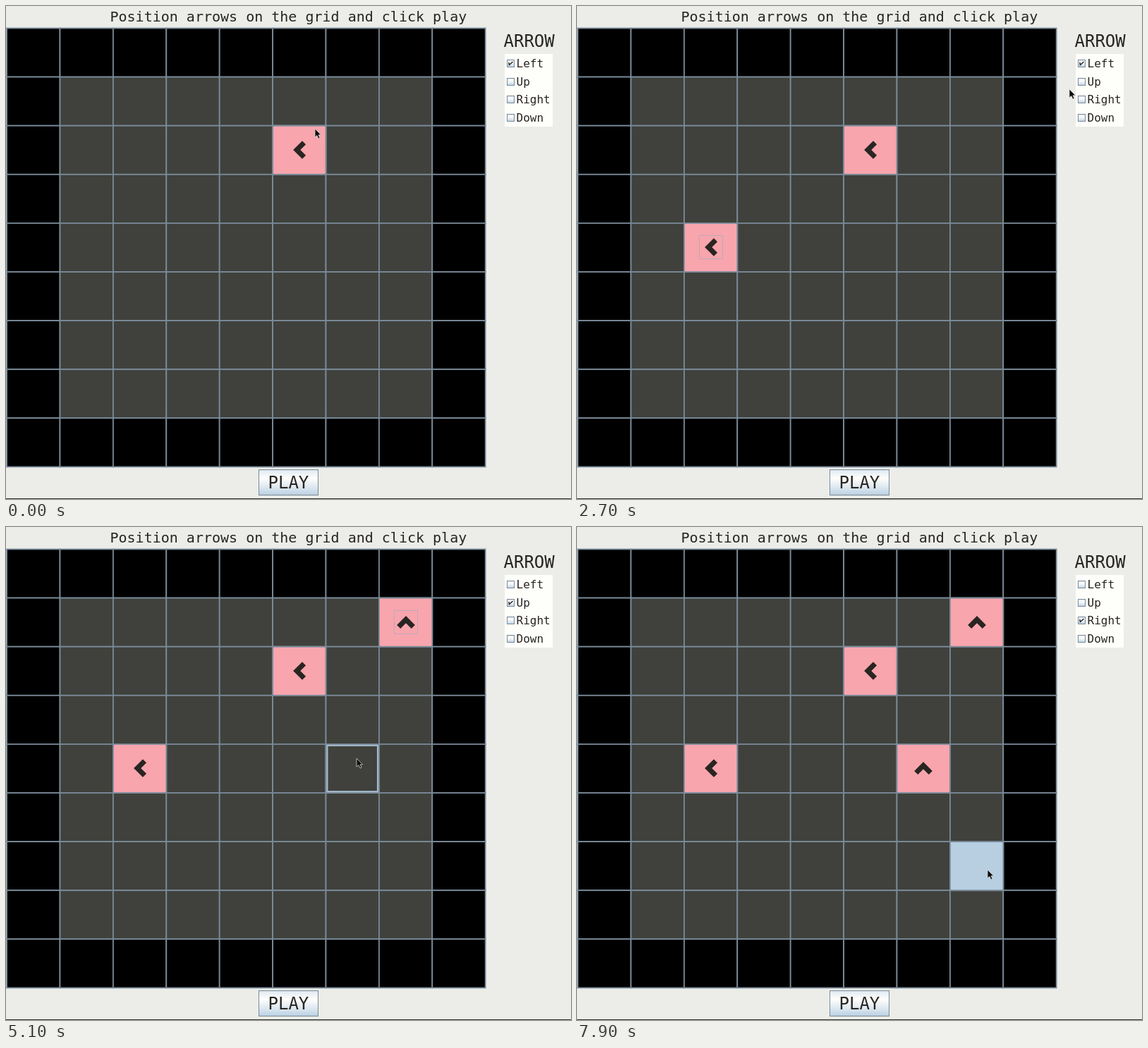
An HTML page with a canvas that plays this animation: 801 px wide and 699 px high, repeating every 8000 ms.

```html
<!DOCTYPE html>
<html lang="en">
<head>
<meta charset="utf-8">
<title>Arrow grid</title>
<style>
html, body { margin: 0; width: 100%; height: 100%; overflow: hidden; background: #ecede8; }
canvas { display: block; }
</style>
</head>
<body>
<canvas id="stage" width="801" height="699"></canvas>
<script>
const LOOP = 8000, STEP = 100, LAG = 100;
const SIZE = 9, CELL_W = 75.4, CELL_H = 69.1, LEFT = 1.1, TOP = 31.5;
const OPTION_TOP = 76, OPTION_GAP = 25.7;
const LINE = '#7a8a99', GLOW = '#a3b8cc', INK = '#282522';
const g = document.getElementById('stage').getContext('2d');

const smooth = k => k * k * (3 - 2 * k);
const out = power => k => 1 - (1 - k) ** power;

// The pointer moves to (x, y) from leave to arrive, then may click there
const stops = [
  { x: 438, y: 174, leave: -2, arrive: -1, press: 0, release: 0 },
  { x: 214, y: 352, leave: 600, arrive: 1300, press: 1700, release: 1900 },
  { x: 698, y: 118, leave: 1900, arrive: 2700, ease: out(5) },
  { x: 714, y: 104, leave: 2700, arrive: 3100, press: 3300, release: 3700 },
  { x: 576, y: 147, leave: 3700, arrive: 4100, press: 4200, release: 4400 },
  { x: 497, y: 328, leave: 4600, arrive: 5100, press: 5300, release: 5700 },
  { x: 714, y: 133, leave: 5700, arrive: 6400, press: 6800, release: 6900 },
  { x: 582, y: 486, leave: 7000, arrive: 7700, press: 7900, release: LOOP, ease: out(3) }
];

const colAt = x => Math.floor((x - LEFT) / CELL_W);
const rowAt = y => Math.floor((y - TOP) / CELL_H);
const onGrid = s => colAt(s.x) < SIZE;

function pointerAt(t) {
  const i = stops.findLastIndex(s => s.leave <= t);
  const to = stops[i], from = stops[i - 1] || to;
  const k = (to.ease || smooth)(Math.min(1, (t - to.leave) / (to.arrive - to.leave)));
  return { x: from.x + (to.x - from.x) * k, y: from.y + (to.y - from.y) * k };
}

function optionAt(t) {
  const click = stops.findLast(s => !onGrid(s) && s.release <= t);
  return click ? Math.round((click.y - OPTION_TOP - 5) / OPTION_GAP) : 0;
}

function rect(color, x, y, w, h) {
  g.fillStyle = color;
  g.fillRect(x, y, w, h);
}

function frame(color, x, y, w, h, width = 1) {
  g.strokeStyle = color;
  g.lineWidth = width;
  g.strokeRect(x + width / 2, y + width / 2, w - width, h - width);
}

function trace(points) {
  g.beginPath();
  points.forEach(p => g.lineTo(...p));
}

function line(width, points) {
  g.strokeStyle = INK;
  g.lineWidth = width;
  trace(points);
  g.stroke();
}

function text(str, x, y, size) {
  g.font = size + 'px "DejaVu Sans Mono", monospace';
  g.fillStyle = INK;
  g.fillText(str, x, y);
}

function metal(y, h) {
  const fill = g.createLinearGradient(0, y, 0, y + h);
  ['#dde8f0', '#fefefc', '#dde8f0', '#b8cfe2'].forEach((c, i) => fill.addColorStop(Math.min(1, i * 0.34), c));
  return fill;
}

function cell(col, row, color, hover) {
  const x = LEFT + col * CELL_W, y = TOP + row * CELL_H;
  rect(color, x, y, CELL_W, CELL_H);
  if (hover) frame(GLOW, x, y, CELL_W, CELL_H, 3);
  frame(LINE, x - 0.9, y - 0.9, CELL_W + 1.8, CELL_H + 1.8, 1.8);
}

function tile(t, stop, focused) {
  const col = colAt(stop.x), row = rowAt(stop.y);
  const placed = t >= stop.release;
  cell(col, row, placed ? '#f8a5ad' : '#b8cfe2');
  if (!placed) return;
  g.save();
  g.translate(Math.round(LEFT + (col + 0.5) * CELL_W), Math.round(TOP + (row + 0.5) * CELL_H));
  if (focused && t >= stop.release + STEP) frame('#bda9bb', -17, -17, 34, 34);
  g.rotate(optionAt(stop.release) * Math.PI / 2);
  line(7.2, [[6.5, -10.3], [-3.8, 0], [6.5, 10.3]]);
  g.restore();
}

function grid(t) {
  // Cells react slightly ahead of the drawn pointer
  const lead = pointerAt(t + LAG);
  for (let row = 0; row < SIZE; row++) {
    for (let col = 0; col < SIZE; col++) {
      const rim = row % (SIZE - 1) === 0 || col % (SIZE - 1) === 0;
      cell(col, row, rim ? '#000' : '#40413c');
    }
  }
  const col = colAt(lead.x), row = rowAt(lead.y);
  if (col < SIZE) cell(col, row, col === SIZE - 1 ? '#000' : '#40413c', true);
  const pressed = stops.filter(s => s.press <= t);
  pressed.filter(onGrid).forEach(s => tile(t, s, s === pressed.at(-1)));
}

function option(label, i, checked) {
  const y = Math.round(OPTION_TOP + OPTION_GAP * i);
  rect(metal(y, 11), 710, y, 11, 11);
  frame(LINE, 710, y, 11, 11);
  if (checked) line(1.5, [[712.8, y + 4], [713.4, y + 7.6], [718.5, y + 3]]);
  text(label, 723.5, y + 11, 16);
}

function pointer({ x, y }) {
  g.save();
  g.translate(Math.round(x), Math.round(y));
  trace([[0, 0], [0, 12], [2.8, 9.6], [5, 14], [7, 13], [5, 8.8], [8.6, 8.8]]);
  g.closePath();
  g.fillStyle = '#0c0c0c';
  g.fill();
  g.strokeStyle = '#d8d8d8';
  g.lineWidth = 0.8;
  g.stroke();
  g.restore();
}

function draw(t) {
  rect('#ecede8', 0, 0, 801, 699);
  rect('#30302e', 0, 698, 801, 1);
  text('Position arrows on the grid and click play', 147.5, 22, 20);
  grid(t);

  text('ARROW', 705.5, 58, 24);
  rect('#fefefa', 707, 68, 68, 103);
  ['Left', 'Up', 'Right', 'Down'].forEach((label, i) => option(label, i, i === optionAt(t)));

  rect(metal(657, 37), 358, 657, 85, 37);
  frame(LINE, 358, 657, 85, 37);
  text('PLAY', 371.5, 684, 24);
  pointer(pointerAt(t));
}

const start = performance.now();
function tick() {
  const t = (performance.now() - start) % LOOP;
  draw(Math.floor(t / STEP) * STEP);
  requestAnimationFrame(tick);
}
tick();
</script>
</body>
</html>
```
